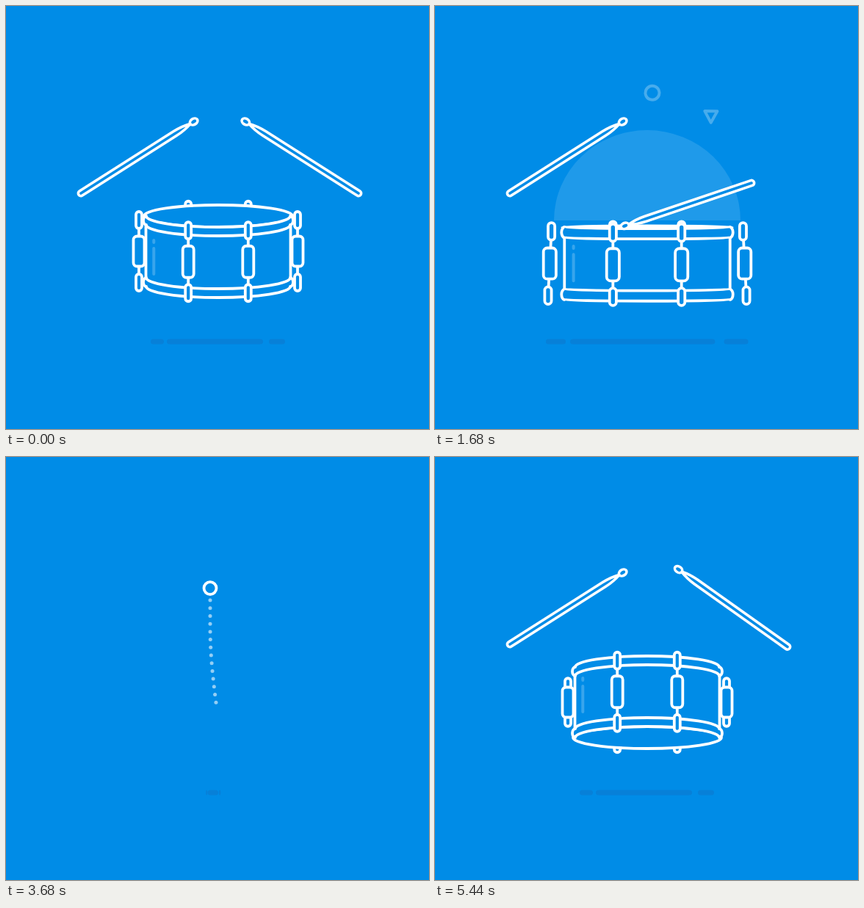
Recreate the animation shown at these times as an HTML page. Size 576 px wide and 576 px high, loop 5.52 s.

```html
<!DOCTYPE html>
<html lang="en">
<head>
<meta charset="utf-8">
<title>Drum loop</title>
<style>
html, body { margin: 0; width: 100%; height: 100%; overflow: hidden; background: #008ce7; }
svg { display: block; width: 100vw; height: 100vh; }
</style>
</head>
<body>
<svg id="stage" viewBox="0 0 576 576"></svg>
<script>
const LOOP = 5520, STEP = 80, CX = 289;
const BLUE = '#008ce7', SHADE = '#0780d8';
const HITS = [640, 1160, 1680, 2200];
const FLOAT = 2360, LAND = 3060, SPLAT = 3120, BALL = 3520, BOUNCE = 480, REFORM = 4480, HOP = 5040, SETTLE = 5440;
const stage = document.getElementById('stage');

const clamp = (v, a = 0, b = 1) => Math.min(b, Math.max(a, v));
const mix = (a, b, p) => a + (b - a) * p;
const ramp = (t, a, b) => { const p = clamp((t - a) / (b - a)); return p * p * (3 - 2 * p); };
const bell = (t, half) => Math.abs(t) < half ? Math.cos(t / half * Math.PI / 2) ** 2 : 0;
const sum = (list, f) => list.reduce((total, v) => total + f(v), 0);
const noise = n => { const v = Math.sin(n * 127.1 + 3.7) * 43758.5; return v - Math.floor(v); };

const group = (body, attrs = '') => `<g ${attrs}>${body}</g>`;
const path = (d, attrs = '') => `<path d="${d}" ${attrs}/>`;
const circle = (x, y, r, attrs = '') => `<circle cx="${x}" cy="${y}" r="${r}" ${attrs}/>`;
const box = (x, y, w, h, r) =>
  `<rect x="${x - w / 2}" y="${y - h / 2}" width="${w}" height="${h}" rx="${r}"/>`;
const outlined = (body, width = 3.8) => group(body,
  `fill="${BLUE}" stroke="#fff" stroke-width="${width}" stroke-linejoin="round" stroke-linecap="round"`);

// How hard the drum is pressed down, 0..1.
const squash = t => sum([...HITS, HOP - 40], hit => bell(t - hit - 40, 220));

// ---- ground shadow ----
function shadow(t) {
  let x = CX - 1, s = 1 + .55 * squash(t);
  if (t > LAND && t < BALL) s = .2 + 2 * bell(t - SPLAT, 400);
  else if (t >= BALL && t < REFORM) {
    const { x: bx, y } = ball(t);
    x += .58 * (bx - CX + 1);
    s = .11 + .25 * ramp(y, 260, 383);
  } else if (t >= REFORM) s *= ramp(t, REFORM - 80, REFORM + 160);
  const parts = [[-91, -73], [-69, 62], [70, 92]].map(([a, b]) =>
    box(x + (a + b) / 2 * s, 457, (b - a) * s, 7, 3.5));
  return group(parts.join(''), `fill="${SHADE}"`);
}

// ---- small shapes ----
function bit(kind, x, y, size, turn, alpha) {
  const d = kind === 'x' ? `M${-size} 0H${size}M0 ${-size}V${size}`
    : `M0 ${-size}L${size * .9} ${size * .65}H${-size * .9}Z`;
  const shape = kind === 'o' ? circle(0, 0, size) : path(d);
  return group(shape, `transform="translate(${x} ${y}) rotate(${turn})" opacity="${alpha}"
    fill="none" stroke="#fff" stroke-width="${clamp(size * .42, 1, 4)}" stroke-linejoin="round"`);
}

// ---- glow and spray of each strike ----
function glow(age) {
  const q = (age - 80) / 440, grow = Math.min(1, age / 80);
  const rx = (100 + 27 * q) * grow, ry = (79 + 44 * q) * grow, y = 303 - 11 * q;
  return path(`M${CX - rx} ${y}A${rx} ${ry} 0 0 1 ${CX + rx} ${y}Z`,
    `fill="#fff" opacity="${clamp(.38 - .26 * q)}"`);
}

function strike(hit, index, t) {
  const age = t - hit;
  if (age <= 0 || age > 640) return '';
  // kind, end x, end y, time constant
  const spray = [['o', 296, 118, 80], ['t', 376, 149, 85], ['o', 205, 181, 22],
    [index % 2 ? 't' : 'x', 239, 142, 110]];
  const bits = spray.map(([kind, x, y, tau]) => {
    const p = 1 - Math.exp(-age / tau), life = x < CX ? 480 : 620;
    const turn = kind === 't' ? 180 + 243 * (1 - p) : 20;
    return bit(kind, mix(CX, x, p), mix(300, y, p), kind === 'x' ? 13 : 9.5, turn,
      .42 * clamp((life - age) / 150));
  });
  return (index < HITS.length - 1 ? glow(age) : '') + bits.join('');
}

// ---- sticks: below 0 wind-up, 0 rest, 1 on the drum ----
function lift(t, hits) {
  const swing = sum(hits, hit => Math.min(1, 1.5 * bell(t - hit - 40, 130)) - .19 * bell(t - hit + 200, 180));
  return swing + (t > REFORM ? 1 - ramp(t, 4600, 4860) : 0);
}

function stick(u, size) {
  const down = Math.max(0, u), back = Math.max(0, -u);
  const shape = path('M-177 0Q-165 -3.6 -152 -3.6H0a3.6 3.6 0 0 1 0 7.2H-152Q-165 3.6 -177 0Z')
    + '<ellipse cx="-182" rx="5.6" ry="4"/>';
  return group(outlined(shape, 3.6), `transform="translate(${480 - 49 * down} ${255 - 14 * down + 60 * back})
    rotate(${32.4 - 51.1 * u}) scale(${size})"`);
}

function sticks(t) {
  const size = 1 - ramp(t, 2240, 2340) + ramp(t, 4600, 4800);
  if (size < .02) return '';
  const right = lift(t, HITS.filter((_, i) => i !== 1)) - .058 * bell(t - SETTLE, STEP);
  const left = lift(t, HITS.filter((_, i) => i % 2));
  return group(stick(left, size), 'transform="translate(582 0) scale(-1 1)"') + stick(right, size);
}

// ---- drum ----
function drumPose(t) {
  const press = squash(t);
  const pose = { y: 334 + 18 * press, w: 102 + 16 * press, v: 1 + .03 * press };
  if (t < REFORM) {
    const away = ramp(t, FLOAT - 120, FLOAT);
    pose.y = mix(pose.y, 190, away);
    pose.w = mix(pose.w, 108, away);
    pose.v = mix(pose.v, .1, away);
    pose.tilt = 15 * Math.exp(-t / 200) * Math.cos(t / 160 * Math.PI) + 2 * press + 25 * away;
  } else {
    const grow = ramp(t, REFORM - 60, REFORM + 140);
    pose.y = t < HOP ? 165 + 235 * ((t - 4760) / 280) ** 2
      : Math.min(t > 5240 ? 334 : 400, 185 + 215 * ((t - 5240) / 200) ** 2);
    pose.w *= grow;
    pose.v *= grow;
    pose.tilt = -15 * Math.cos((t - SETTLE) / 160 * Math.PI) * grow;
  }
  return pose;
}

function hoop(y, w, h, tilt) {
  const r = Math.abs(tilt), sweep = tilt > 0 ? 0 : 1, x = w - 4;
  return path(`M${-x} ${y}A${x} ${r} 0 0 ${sweep} ${x} ${y}a4 ${h / 2} 0 0 1 0 ${h}
    A${x} ${r} 0 0 ${1 - sweep} ${-x} ${y + h}a4 ${h / 2} 0 0 1 0 ${-h}Z`);
}

function drum(t) {
  if (t > FLOAT && t < REFORM) return '';
  const { y: cy, w, tilt, v } = drumPose(t);
  const press = squash(t), spread = 1 - .5 * bell(t - SETTLE, STEP);
  // Side lugs fly outward just before contact.
  const out = 6 + 10 * bell(t - HITS[2], 70);
  const s = w / 102, half = 48 * v, h = 12 * s * v, r = Math.abs(tilt), reach = 42.5 * v;
  const facing = tilt > 0 ? -1 : 1, front = tilt * .95, body = w - 3.5 * s;
  const cap = (x, y) => box(x, y, 8 * s, 23 * v, 4 * s);
  const both = f => f(-1) + f(1);

  let d = both(side => cap(side * .4 * w, facing * reach - front));
  d += both(side => {
    const x = side * (w + out), k = side * 2.5 * press, far = reach * spread;
    return path(`M${x - k} ${-far}L${x + k} ${far}`)
      + cap(x - k, -far) + cap(x + k, far) + box(x, 0, 15 * s, 41 * v, 5);
  });
  d += path(`M${-body} ${-half}V${half}H${body}V${-half}Z`, 'stroke="none"')
    + path(`M${-body} ${-half}V${half}M${body} ${-half}V${half}`);
  if (r > .5) d += `<ellipse cy="${facing * half}" rx="${w - 1}" ry="${r}"/>`;
  d += hoop(-half, w, h, tilt) + hoop(half - h, w, h, tilt);
  d += both(side => {
    const x = side * .4 * w;
    return path(`M${x} ${front - reach}V${front + reach}`)
      + cap(x, front - reach) + cap(x, front + reach) + box(x, front, 15 * s, 43 * v, 5 * s);
  });
  const gx = -.86 * w, gy = tilt * .6;
  const shine = path(`M${gx} ${gy - 24 * v}v${3 * v}M${gx} ${gy - 13 * v}V${gy + 22 * v}`,
    'stroke="#fff" stroke-width="4" stroke-linecap="round" opacity=".22"');
  return group(outlined(d) + shine, `transform="translate(${CX} ${cy})"`);
}

// ---- flying drumhead ----
const headY = t => 143 + 47 * Math.exp((FLOAT - t) / 60) + 217 * Math.max(0, (t - 2880) / 180) ** 2;

function ring(t) {
  return circle(CX - 1, 314, 119.5 + (t - 2480) * .04,
    `fill="none" stroke="${SHADE}" stroke-width="5" opacity="${.6 * bell(t - 2500, 220)}"`);
}

function head(t) {
  if (t <= FLOAT || t > LAND) return '';
  const w = 110.5, lower = ry => `M${-w} 0A${w} ${ry} 0 0 0 ${w} 0`;
  const d = path(`${lower(32)}A${w} 43 0 0 0 ${-w} 0Z`) + path(lower(23));
  return group(outlined(d, 3.6), `transform="translate(${CX} ${headY(t)})"`);
}

function debris(t) {
  if (t < 2640 || t > 3400) return '';
  const alpha = .42 * clamp((t - 2640) / 160), shrink = clamp((3400 - t) / 280);
  let out = '';
  for (let i = 0; i < 7; i++) {
    const fall = t - SPLAT;
    out += bit('xto'[i % 3], 180 + 160 * noise(i), 240 + 30 * i + fall * .4,
      (5 + 3 * noise(i + 20)) * shrink, 45 + i * 45 + fall * .25, alpha);
  }
  return out;
}

// ---- bar and bouncing ball ----
function sway(y, second) {
  return CX - 1 + (second ? 24 : -10) * Math.sin(clamp((350 - y) / 240, 0, .5) * Math.PI);
}

function ball(t) {
  const second = t >= BALL + BOUNCE;
  const p = ((t - BALL) % BOUNCE) / BOUNCE * 2 - 1;
  const y = 153 + 230 * p * p;
  return { x: sway(y, second), y };
}

function bar(t) {
  if (t <= LAND || t >= REFORM) return '';
  if (t >= BALL) {
    const { x, y } = ball(t);
    return outlined(circle(x, y, 8.5));
  }
  const wide = bell(t - SPLAT, BALL - SPLAT);
  const half = 188 * wide, r = 9 + 2.5 * wide, y = 383 - 6 * wide;
  const sag = 15 * wide * Math.cos((t - SPLAT) / 240 * Math.PI);
  const d = `M${CX - half} ${y - r}q${half} ${sag * 2 + 2} ${half * 2} 0
    a${r} ${r} 0 0 1 0 ${2 * r}q${-half} ${sag * 2 - 2} ${-half * 2} 0
    a${r} ${r} 0 0 1 0 ${-2 * r}Z`;
  return outlined(path(d), 3.8 + 1.8 * wide);
}

function trail(t) {
  let dots = '';
  if (t >= 2960 && t <= 3280) {
    const top = 185 + 200 * ramp(t, SPLAT, 3280);
    const end = t <= LAND ? headY(t) - 45 : 374;
    for (let y = 185; y < end; y += 10.85) if (y >= top) dots += circle(288.5, y, 2.5);
  } else if (t > BALL && t < REFORM) {
    const second = t >= BALL + BOUNCE, now = ball(t).y;
    const before = ball(Math.max(second ? BALL + BOUNCE : BALL, t - 132)).y;
    const low = Math.min(now, before), high = Math.max(now, before);
    for (let y = 377; y > 150; y -= 10.7)
      if (y >= low && y <= high + 2 && Math.abs(y - now) > 14) dots += circle(sway(y, second), y, 2.5);
  }
  return group(dots, 'fill="#fff" opacity=".58"');
}

function burst(t, start) {
  const age = t - start;
  if (age <= 0 || age > 240) return '';
  const p = 1 - Math.exp(-age / 70);
  let dots = '';
  for (let i = 0; i < 22; i++) {
    const angle = Math.PI * (i + .5) / 22, reach = (45 + 55 * noise(i)) * p;
    dots += circle(CX - Math.cos(angle) * reach, 440 - Math.sin(angle) * reach * .75, Math.max(.6, 4 - age / 45));
  }
  return group(dots, `fill="#fff" opacity="${clamp(.45 - age / 500)}"`);
}

function draw(t) {
  stage.innerHTML = shadow(t) + ring(t) + head(t)
    + HITS.map((hit, i) => strike(hit, i, t)).join('')
    + drum(t) + trail(t) + bar(t) + sticks(t) + debris(t)
    + burst(t, BALL + BOUNCE) + burst(t, REFORM);
}

const start = performance.now();
function tick() {
  const elapsed = (performance.now() - start) % LOOP;
  draw(Math.floor(elapsed / STEP) * STEP);
  requestAnimationFrame(tick);
}
tick();
</script>
</body>
</html>
```
